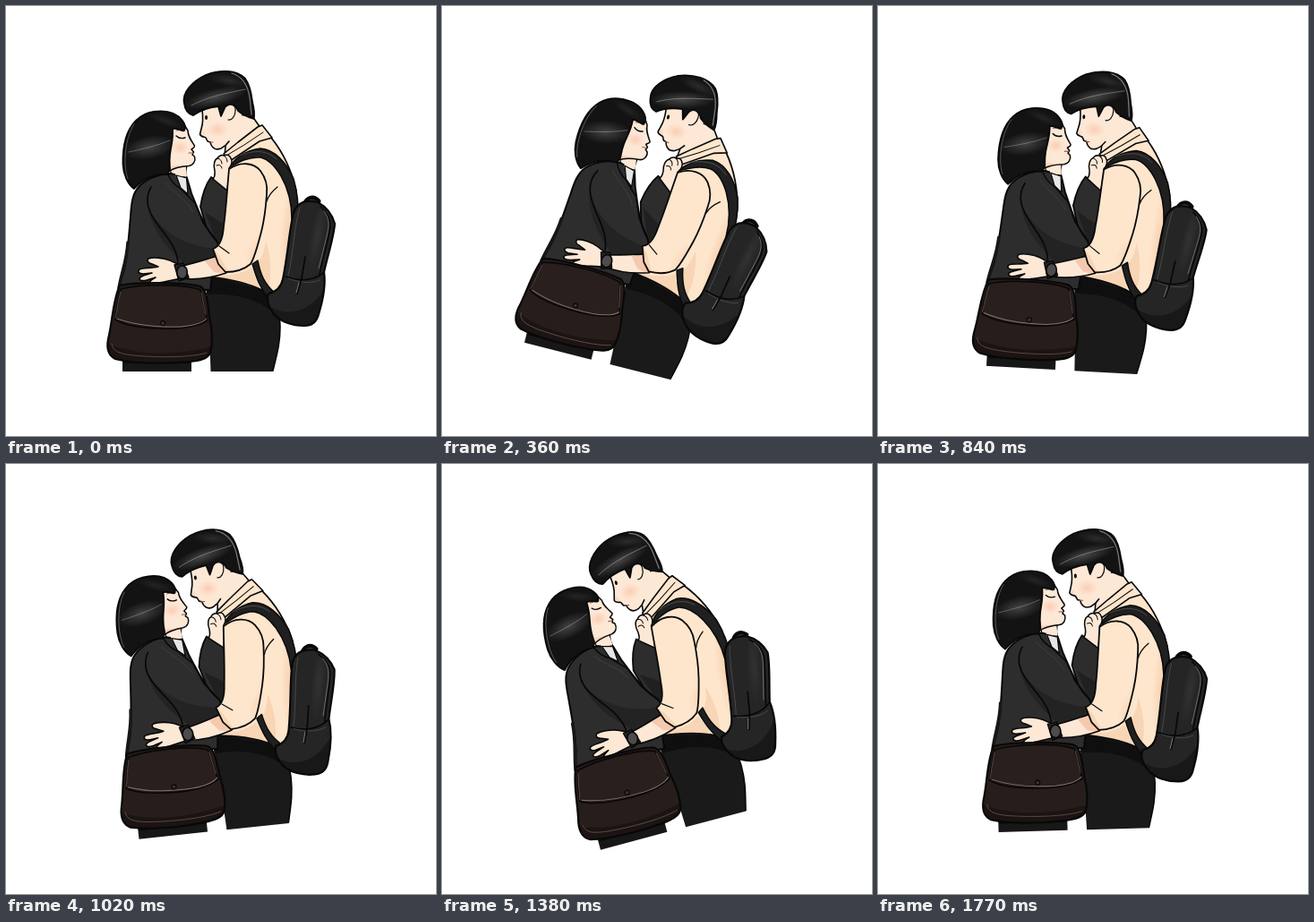
An HTML page with a canvas for the animation above (1.8 s loop, 480 by 480 pixels).

```html
<!DOCTYPE html>
<html lang="en">
<head>
<meta charset="utf-8">
<title>Swaying couple</title>
<style>
html, body { margin: 0; width: 100%; height: 100%; overflow: hidden; background: #fff; }
canvas { display: block; width: 100vw; height: 100vh; }
</style>
</head>
<body>
<canvas id="stage"></canvas>
<script>
const SIZE = 480, LOOP = 1800, STEP = 30, SWING = 15 * Math.PI / 180;
const canvas = document.getElementById('stage');
const ctx = canvas.getContext('2d');

const INK = '#080808', SKIN = '#fde8d6', SHIRT = '#fee6cd', SHADE = '#f8d5b5';
const JACKET = '#2d2d2d', PACK = '#252525', LEATHER = '#271d1b', HAIR = '#131313';

// Layers are painted in order, each a filled and/or stroked path.
const layers = [];
const shape = (d, fill, width = 1.8, stroke = INK, details) =>
  layers.push({ path: new Path2D(d), fill, width, stroke, details });
const line = (d, width = 1.6, stroke = INK) => shape(d, null, width, stroke);
const patch = (d, fill) => shape(d, fill, 0);
// A filled shape whose details are clipped to it, under its outline.
const shaded = (d, fill, width, details) => shape(d, fill, width, INK, details);

function blot(d, fill) {
  ctx.fillStyle = fill;
  ctx.fill(new Path2D(d));
}

function glow(x, y, rx, ry, turn, rgb, alpha) {
  ctx.save();
  ctx.translate(x, y);
  ctx.rotate(turn);
  ctx.scale(rx, ry);
  const g = ctx.createRadialGradient(0, 0, 0, 0, 0, 1);
  g.addColorStop(0, `rgba(${rgb},${alpha})`);
  g.addColorStop(1, `rgba(${rgb},0)`);
  ctx.fillStyle = g;
  ctx.fillRect(-1, -1, 2, 2);
  ctx.restore();
}

function man() {
  shaded('M250 168L284 140L296 147C309 163 319 184 324 207L322 250L312 310L296 326C268 312 242 308 222 306L238 270L248 205Z', SHIRT, 1.8, () => {
    blot('M277 290C284 286 288 276 290 262C296 280 297 300 292 320Z', SHADE);
    blot('M226 298C244 303 262 300 274 292L284 318L222 306Z', SHADE);
    glow(315, 250, 9, 60, 0.1, '240,185,145', 0.4);
  });

  // neck, face and ear
  shape('M275 123L284 136L264 158L244 167L245 157L250 120Z', SKIN, 1.6);
  shaded('M219 110C220 124 220 131 218 137L216.500 143C217 146 221 146 223 147L225 151L228 152L229 155C231 159 235 161 240 159C247 155 252 149 258 140L266 112L235 100Z', SKIN, 0, () => {
    glow(236, 138, 12, 9, 0, '248,165,130', 0.4);
    glow(219, 143, 5, 5, 0, '248,165,130', 0.3);
  });
  line('M219 116C220 124 220 131 218 137L216.500 143C217 146 221 146 223 147L225 151L228 152L229 155C231 159 235 161 240 159C244 157 247 154 249 151', 1.6);
  line('M227 152L231 152', 1.1, '#a44f45');
  patch('M223.500 122a1.500 2.500 0 1 0 .1 0Z', INK);

  shaded('M199 109C196 97 208 84 223 77C239 71 257 71 267 81C273 89 274 99 275 107C277 115 278 121 276.500 126C270 124 264 121 259 117C257 110 249 108 245 112L240 123L237 112C228 113 217 116 209 122C204 121 200 117 199 109Z', HAIR, 1.8, () => {
    glow(234, 102, 36, 10, -0.25, '150,150,150', 0.38);
    glow(248, 83, 24, 7, 0.2, '90,90,90', 0.35);
  });
  shape('M245 113C249 108 257 110 256 117C256 123 252 128 248 127', SKIN, 1.2);
  line('M207 111C220 104 234 100 248 97L267 93', 0.7, 'rgba(215,215,215,.55)');
  line('M252 75C265 79 270 89 272 102L274 121', 1.3, '#777');

  // collar
  shape('M243 165L259 152L281 135L286 133L297 147L283 151L250 173Z', SHIRT, 1.6);
  line('M246 167L266 155L287 141', 1);
}

function legs() {
  patch('M130 388H207V408H130Z', '#171717');
  line('M131 398H206', 1.2, '#050505');
  shaded('M222 301C245 304 270 309 288 318C300 328 306 343 306 358C306 378 302 390 298 408H228.500L226 340Z', '#1a1a1a', 0, () =>
    blot('M222 300L290 318L306 350C285 326 255 320 222 322Z', '#0f0f0f'));
  line('M226 302C245 304 270 309 288 318C300 328 306 343 306 358C306 378 302 390 298 407', 1.6);
}

function straps() {
  shape('M249 180C257 168 269 161 284 159C300 160 313 175 321 193C325 207 327 220 326 238H319C319 222 315 204 307 190C300 178 293 171 284 169C272 168 262 173 249 180Z', '#202020', 1.5);
  line('M261 167C277 160 292 161 302 171', 0.8, '#555');
  shape('M275 288L281 284C284 300 289 311 300 320L293 327C283 314 279 302 275 288Z', '#202020', 1.4);
}

function backpack() {
  line('M333 224C334 214 343 211 349 218', 5);
  line('M335 222C337 216 343 215 347 219', 1.8, '#363636');
  shaded('M321 231C325 219 335 216 348 219C357 224 364 232 367 243C366 258 359 279 355 297C357 311 354 328 349 344C347 352 342 357 333 357C319 357 306 352 299 344C293 336 290 328 293 321C302 319 307 314 309 305C315 276 316 250 321 231Z', PACK, 2.2, () => {
    blot('M296 336C314 347 340 342 355 316L352 360H300Z', '#181818');
    glow(348, 255, 8, 42, 0.2, '80,80,80', 0.3);
  });
  line('M351 224C359 231 363 238 362 247C359 265 353 284 350 300');
  line('M355 229C361 237 361 244 358 257L349 293', 0.8, '#777');
  line('M328 225C321 249 321 276 315 301', 1, '#484848');
  line('M312 302C325 307 342 308 354 298', 1.8);
  line('M315 304C328 309 342 310 350 306', 0.7, '#555');
  line('M334 280L330 304L325 321', 1.7);
  line('M327 309L324 320', 1, '#777');
}

function woman() {
  shape('M181 172L202 176L201 186L205 210L187 199Z', SKIN, 1.2);
  shaded('M198 131L203 139C203 145 206 149 210.500 156C211 158 208 159 207 160L209.500 163L208 166L210.500 168C212 173 209 178 204 178.500C196 179 187 181 181 185L178 151L184 132Z', SKIN, 1.5, () => {
    glow(194, 158, 10, 8, 0, '248,165,130', 0.4);
    glow(190, 181, 12, 4, 0, '235,160,125', 0.5);
  });
  line('M190 145Q194 149 200 147', 1.4);
  line('M190 139Q194 137 198 140', 0.8, '#655049');
  line('M204 164L208.500 164', 1.1, '#a44f45');

  // raised sleeve
  shaded('M229 191C223 199 219 211 217 224L224 249L238 270C244 255 249 229 249 207Z', JACKET, 1.8, () =>
    blot('M222 230L244 244L238 272Z', '#202020'));

  shaded('M184 187C172 187 157 192 148 202C141 210 140 220 139 235C137 257 136 276 132 294L126 314L228 317L232 281C238 273 239 267 234 261C222 248 215 229 207 209L202 192Z', JACKET, 2, () =>
    blot('M159 227C176 253 196 266 232 271V283L200 288C182 273 164 253 159 227Z', '#232323'));
  line('M162 202C155 214 157 226 166 239C175 254 189 264 192 286', 1.7);
  line('M181 188C184 196 190 201 195 204L211 220L220 242L235 262', 1.5);
  line('M178 197C188 210 201 215 209 230', 0.7, '#444');

  // blouse collar
  patch('M188 183L201 181L202 190L190 191Z', SKIN);
  shape('M190 189L201.500 192L203 210L195 203Z', '#e6e6e5', 1.2);

  shaded('M165 118C180 116 191 120 197 128C200 132 201 135 199 139C194 139 190 136 186 137C187 149 184 156 183 166C182 174 183 179 183 182L180 188C166 187 153 193 143 204C136 199 131 188 130.500 177C130 158 133 140 145 128C151 122 158 119 165 118Z', HAIR, 1.8, () => {
    glow(160, 158, 29, 13, -0.2, '150,150,150', 0.36);
    glow(178, 128, 22, 6, 0.35, '85,85,85', 0.25);
  });
  line('M137 163C151 160 169 156 183 150', 0.7, 'rgba(215,215,215,.45)');
  line('M143 132C133 147 130 176 136 193', 0.8, '#666');

  // raised hand
  shape('M233 184C231 177 233 171 236 170C238 167 241 166 244 167C247 165 250 167 251 170C253 173 252 178 249 181C250 187 248 194 247 206L231 193C234 190 233 187 233 184Z', SKIN, 1.5);
  line('M236 170Q241 171 241 176', 1);
  line('M243 167Q247 169 247 174', 1);
  line('M235 178Q240 176 241 181', 1);
}

function arm() {
  shaded('M240 278C222 283 208 288 196 290L183 284C175 281 164 280 159 282C157 284 158 287 163 288L170 291C162 293 153 292 149 294C146 297 149 299 153 299L163 298C157 300 150 301 149 304C149 307 153 307 157 306L167 303C162 306 160 307 161 309C163 311 170 309 176 308L195 304C212 306 228 304 246 298Z', SKIN, 1.6, () =>
    blot('M222 285L238 278L247 300L232 297Z', '#f5c9ae'));
  shape('M188 289L198 287L204 303L193 307Z', '#242424', 1.4);
  shape('M196.500 290a5.800 7.200 0 1 0 .1 0Z', '#4d4b4b', 1.6);

  const sleeve = 'M249 182C262 173 277 175 284 184C290 192 292 202 291 210C290 226 288 240 285 252C281 267 278 280 273 288C266 294 256 297 245 297L237 288L231 271C238 269 242 261 243 246C246 224 247 202 249 182';
  shaded(sleeve, SHIRT, 1.8, () => {
    blot('M231 271L238 278L249 298L242 297L235 285Z', SHADE);
    glow(277, 273, 9, 22, 0.4, '240,185,145', 0.25);
  });
  line('M291 218C293 211 298 206 303 202', 1.3);
  line('M238 268L249 276', 1.2);
}

function bag() {
  line('M136 264C135 284 129 297 126 315', 3.6, '#171717');
  shaded('M127 312C144 308 197 308 217 313C225 318 225 331 227 347C230 361 231 376 228 387C225 394 216 396 205 397C177 400 143 399 122 394C114 390 112 383 114 372C119 352 119 329 127 312Z', LEATHER, 2.2, () =>
    blot('M112 376C145 391 190 390 231 380V400H112Z', '#1c1413'));
  shape('M128 316C151 310 199 310 217 317L225 351C210 360 187 361 169 360C151 359 133 357 122 350C122 344 125 327 128 316Z', '#291f1d', 1.7);
  line('M124 349C143 356 170 359 195 358C209 357 219 354 224 349', 1, '#81716e');
  line('M128 319C124 334 124 341 122 348', 0.8, '#665754');
  line('M218 320L223 344', 0.8, '#665754');
  line('M118 377C119 386 127 388 142 390C174 393 210 392 224 387', 0.9, '#5c4d4a');
  shape('M175 351.500a2.500 2.500 0 1 0 .1 0Z', '#3d302e', 1.3);
}

[man, legs, straps, backpack, woman, arm, bag].forEach(part => part());

function paint({ path, fill, width, stroke, details }) {
  if (fill) {
    ctx.fillStyle = fill;
    ctx.fill(path);
  }
  if (details) {
    ctx.save();
    ctx.clip(path);
    details();
    ctx.restore();
  }
  if (width) {
    ctx.strokeStyle = stroke;
    ctx.lineWidth = width;
    ctx.stroke(path);
  }
}

function resize() {
  const dpr = window.devicePixelRatio || 1;
  canvas.width = Math.round(innerWidth * dpr);
  canvas.height = Math.round(innerHeight * dpr);
}

const start = performance.now();
function frame() {
  const now = performance.now() - start;
  const t = Math.floor(now % LOOP / STEP) * STEP;
  ctx.setTransform(canvas.width / SIZE, 0, 0, canvas.height / SIZE, 0, 0);
  ctx.fillStyle = '#fff';
  ctx.fillRect(0, 0, SIZE, SIZE);
  ctx.translate(SIZE / 2, SIZE / 2);
  ctx.rotate(SWING * Math.sin(2 * Math.PI * t / LOOP));
  ctx.translate(-SIZE / 2, -SIZE / 2);
  ctx.lineCap = ctx.lineJoin = 'round';
  layers.forEach(paint);
  requestAnimationFrame(frame);
}

addEventListener('resize', resize);
resize();
frame();
</script>
</body>
</html>
```
